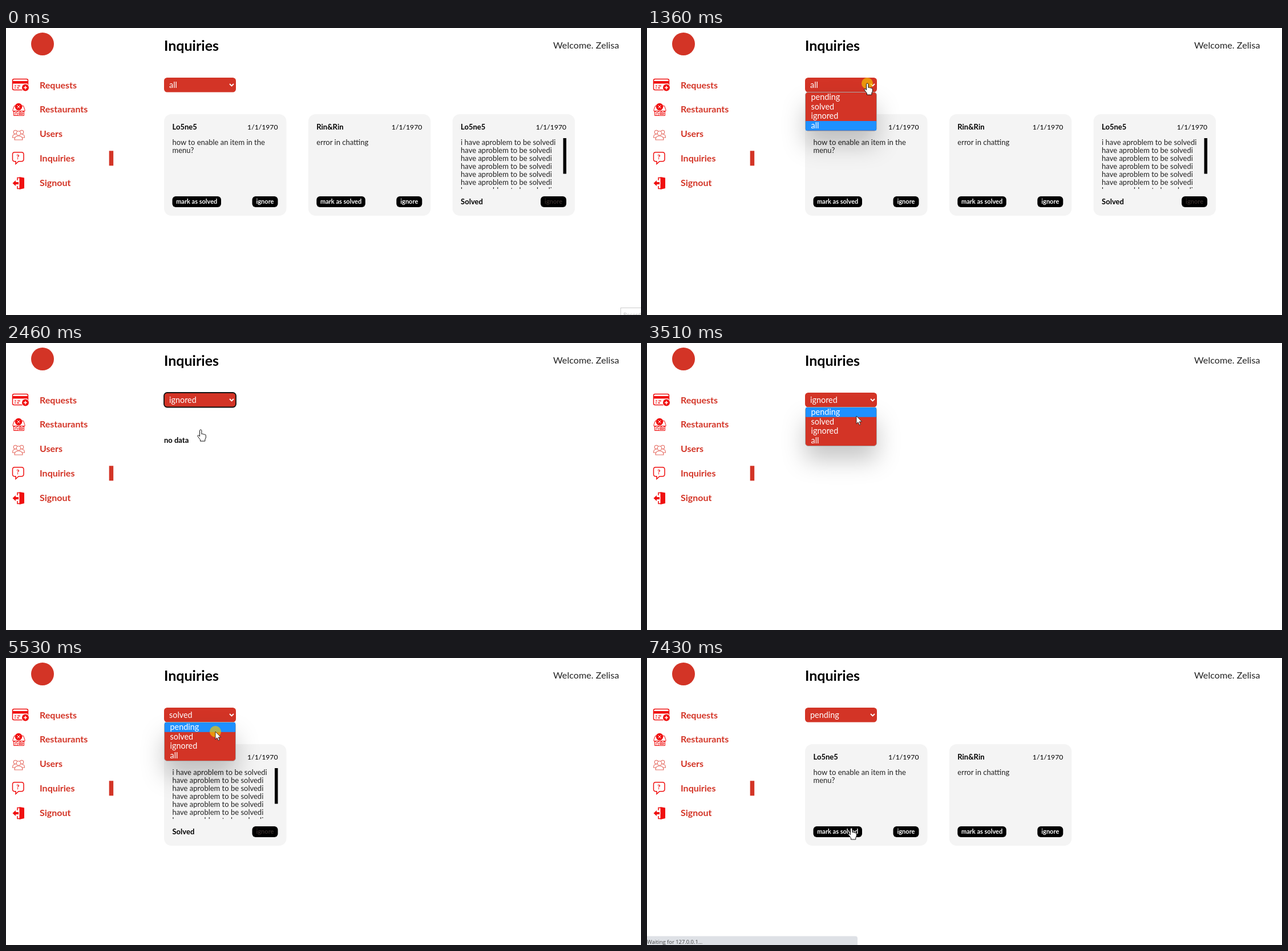
An HTML page that plays this animation: 1113 by 503 pixels, repeating every 8 s.

```html
<!DOCTYPE html>
<html lang="en">
<head>
<meta charset="utf-8">
<title>Inquiries</title>
<style>
html, body { margin: 0; height: 100%; overflow: hidden; background: #fff; }
svg { display: block; width: 1113px; height: 503px; font: 13px Lato, sans-serif; }
.bold, .nav, .button { font-weight: 700; }
.nav { font-size: 16px; fill: #d33426; }
.button { font-size: 11px; fill: #fff; text-anchor: middle; }
.date { font-size: 12.2px; text-anchor: end; }
.body { fill: #222; }
.icons { fill: none; stroke: #f01010; stroke-width: 1.5; }
.icons .solid { fill: #f01010; stroke: none; }
.icons .white { stroke: #fff; }
.white-text { fill: #fff; font-size: 14.4px; }
#menu { filter: drop-shadow(0 24px 20px rgba(0, 0, 0, .22)); }
#cursor path { fill: #fff; stroke: #111; stroke-linejoin: round; }
</style>
</head>
<body>
<svg viewBox="0 0 1113 503">
  <circle cx="64" cy="28" r="20" fill="#d33426"/>
  <text class="bold" x="277" y="39.500" font-size="25">Inquiries</text>
  <text x="959" y="36" font-size="16.200" fill="#222">Welcome. Zelisa</text>

  <g class="icons">
    <rect x="11.500" y="89.500" width="27" height="19" rx="2.500"/>
    <path class="solid" d="M11 93h28v4.500H11z"/>
    <path d="M15 101.500h3m2 0h5M15 105h2m2 0h4"/>
    <circle class="solid" cx="34" cy="104.500" r="7" style="fill:#fff"/>
    <circle class="solid" cx="34" cy="104.500" r="6"/>
    <path class="white" d="M31 104.500h6m-3-3v6"/>

    <g stroke-width="1">
      <path d="M13.500 145v8.500h18V145M16 136.500h-1.500L12 143.500v2h21v-2l-2.500-7H28M12 145.500q2.600 2.500 5.200 0 2.600 2.500 5.200 0 2.600 2.500 5.200 0 2.600 2.500 5.200 0M16 153v-4.500h3.500v4.500M22 148.500h7.500v3H22zM24.500 148.500v3m2.500-3v3"/>
      <circle class="solid" cx="22" cy="138" r="6.300"/>
      <path class="white" d="M19.500 135.500l5 5m0-5l-5 5"/>
    </g>

    <g stroke="#e56a60" stroke-width="1.100">
      <circle cx="16.500" cy="182.500" r="3.200"/>
      <circle cx="27.500" cy="182.500" r="3.200"/>
      <path d="M17 192h-5.500q0-6 5-6M27 192h5.500q0-6-5-6"/>
      <circle cx="22" cy="184.500" r="3.800" fill="#fff"/>
      <path d="M15 196q0-7 7-7t7 7z" fill="#fff"/>
    </g>

    <path d="M15 217.800h12q4 0 4 4v8q0 4-4 4h-5l-5 4.500v-4.500h-2q-3.500 0-3.500-4v-8q0-4 3.500-4z"/>
    <text class="solid bold" x="18" y="230" font-size="12">?</text>

    <path class="solid" d="M23.500 261l8.500 1.500v18.500l-8.500 2zM11.500 272l5.500-5v3h5v4h-5v3z"/>
    <path d="M24 262.500h-4v4.500m0 10v4.500h4"/>
  </g>
  <g class="nav">
    <text x="59" y="105.500">Requests</text>
    <text x="59" y="148">Restaurants</text>
    <text x="59" y="191">Users</text>
    <text x="59" y="234">Inquiries</text>
    <text x="59" y="277">Signout</text>
    <rect x="180.700" y="215.300" width="7.500" height="26"/>
  </g>

  <clipPath id="bodyClip"><rect y="190" width="215" height="92"/></clipPath>
  <g id="cards"></g>
  <text id="empty" class="bold" x="277" y="175">no data</text>

  <rect id="select" x="277" y="87" width="126" height="25.500" rx="5.500" fill="#d33426"/>
  <text id="value" class="white-text" x="286" y="104.500"></text>
  <path d="M392 98l3.500 3.500 3.500-3.500" fill="none" stroke="#fff" stroke-width="1.800"/>
  <g id="menu">
    <rect x="277.500" y="112.500" width="125" height="68" rx="5" fill="#d33426" stroke="#aaa"/>
    <rect id="highlight" x="278" width="124" height="16.700" rx="1" fill="#1e90ff"/>
  </g>

  <g id="recorder">
    <rect x="1077.500" y="490.500" width="40" height="20" fill="#fff" stroke="#ccc"/>
    <text x="1082" y="506" font-size="10" fill="#bbb">Record</text>
  </g>
  <g id="status">
    <path d="M0 487.500h365q4 0 4 4V503H0z" fill="#dee1e6"/>
    <text x="0" y="500.500" font-size="9.400" font-family="Open Sans, sans-serif" fill="#444">Waiting for 127.0.0.1...</text>
  </g>
  <circle id="click" r="10" fill="#f5c400" opacity=".68"/>
  <g id="cursor">
    <path id="arrow" d="M0 0V13.600L3 10.700 5.200 15.600 7.300 14.700 5.200 9.900H9.600Z" stroke-width=".8"/>
    <path id="hand" d="M-1.500 1.700a1.700 1.700 0 0 1 3.400 0V7.500q1.600-1 2.800.5 1.700-.7 2.500.6 2-.4 2.100 1.600V14l-1.500 3v3H-.5v-2.500L-5 11.500q-.5-2 1.500-1.800l2 1.800z"/>
  </g>
</svg>
<script>
const LOOP = 8000, ROW = 16.7, MENU_TOP = 113;
const $ = id => document.getElementById(id);
const show = (el, on) => el.style.display = on ? '' : 'none';
const between = (t, spans) => spans.some(([a, b]) => t >= a && t < b);

const options = ['pending', 'solved', 'ignored', 'all'];
const visibleCards = { all: [0, 1, 2], pending: [0, 1], solved: [2], ignored: [] };
const selections = [[0, 'all'], [2400, 'ignored'], [4110, 'solved'], [5670, 'pending']];
const menuOpen = [[1280, 2400], [3190, 4110], [4780, 5670]];
const outlined = [[2400, 3190], [4110, 4780], [5670, 7020]];
const clicks = [[1280, 1420], [2330, 2400], [3190, 3330], [3970, 4110], [4780, 4920], [5530, 5670], [6960, 7020]];

// Pointer moves: first step, last step, number of steps, destination
const start = [1100, 500];
const moves = [
  [70, 600, 8, 465, 126],
  [830, 1010, 4, 386, 97],
  [1750, 2100, 6, 341, 152],
  [2530, 2930, 7, 392, 102],
  [3330, 3510, 4, 367, 128],
  [3580, 3710, 3, 362, 139],
  [4200, 4520, 5, 388, 107],
  [4920, 5260, 6, 367, 129],
  [5990, 6300, 5, 374, 220],
  [6360, 6690, 6, 358, 298]
];

const longText = ['i ', '', '', '', '', '', ''].map(s => s + 'have aproblem to be solvedi');
const button = (x, w, label, color = '#fff') =>
  `<rect x="${x}" y="295" width="${w}" height="19" rx="6"/>
   <text class="button" x="${x + w / 2}" y="308.300" style="fill:${color}">${label}</text>`;

function card(name, lines, solved) {
  const body = lines.map((s, i) => `<text class="body" x="14.500" y="${205 + 14 * i}">${s}</text>`).join('');
  return `<g><rect y="151" width="214.500" height="178" rx="13" fill="#f4f4f4"/>
    <text class="bold" x="14.500" y="178">${name}</text>
    <text class="date" x="199.500" y="178">1/1/1970</text>
    <g clip-path="url(#bodyClip)">${body}</g>
    ${solved ? '<rect x="194" y="193" width="5.500" height="62.500"/><text class="bold" x="14.500" y="309">Solved</text>'
             : button(14.5, 85.5, 'mark as solved')}
    ${button(154.5, 45, 'ignore', solved ? '#332a28' : '#fff')}</g>`;
}

$('cards').innerHTML =
  card('Lo5ne5', ['how to enable an item in the', 'menu?']) +
  card('Rin&amp;Rin', ['error in chatting']) +
  card('Lo5ne5', longText, true);
$('menu').insertAdjacentHTML('beforeend', options.map((s, i) =>
  `<text class="white-text" x="287.500" y="${126 + ROW * i}">${s}</text>`).join(''));

function pointerAt(t) {
  let [x, y] = start;
  for (const [from, to, steps, toX, toY] of moves) {
    if (t < from) break;
    const step = 1 + Math.floor((t - from) / (to - from) * (steps - 1));
    const p = Math.min(1, step / steps);
    x += (toX - x) * p;
    y += (toY - y) * p;
  }
  return [x, y];
}

function draw(t) {
  const value = selections.filter(s => s[0] <= t).pop()[1];
  const [x, y] = pointerAt(t);
  const open = between(t, menuOpen);

  const shown = visibleCards[value];
  [...$('cards').children].forEach((el, i) => {
    const slot = shown.indexOf(i);
    show(el, slot >= 0);
    el.setAttribute('transform', `translate(${277 + 252.8 * slot})`);
  });
  show($('empty'), !shown.length);

  $('value').textContent = value;
  const focus = between(t, outlined);
  $('select').setAttribute('stroke', focus ? '#111' : 'none');
  $('select').setAttribute('stroke-width', 1.8);
  show($('menu'), open);
  const row = y < MENU_TOP ? options.indexOf(value) : Math.min(3, Math.floor((y - MENU_TOP) / ROW));
  $('highlight').setAttribute('y', MENU_TOP + ROW * row);

  const overSelect = x > 277 && x < 403 && y > 87 && y < MENU_TOP;
  const hand = overSelect || (x < 377 && y > 294) || between(t, [[2400, 2530]]);
  const at = `translate(${x} ${y})`;
  show($('hand'), hand);
  show($('arrow'), !hand);
  show($('cursor'), t >= 70);
  $('cursor').setAttribute('transform', at);
  $('click').setAttribute('transform', at);
  show($('click'), between(t, clicks));
  show($('recorder'), t < 70);
  show($('status'), t >= 7430);
}

function tick() {
  draw(performance.now() % LOOP);
  requestAnimationFrame(tick);
}
tick();
</script>
</body>
</html>
```
